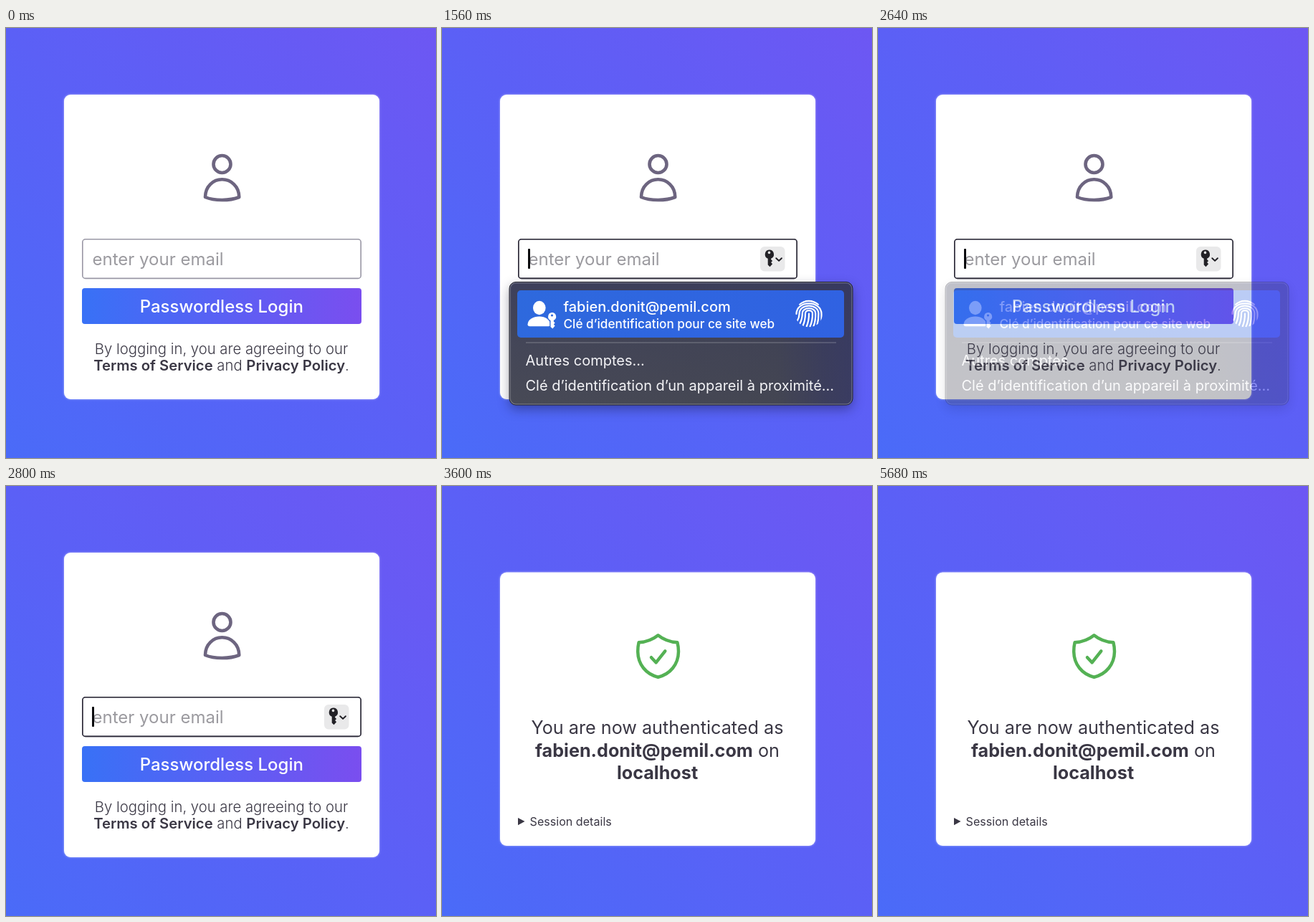
Animation, 600 px wide and 600 px high, one loop 5.8 s. Source, as an HTML page:

```html
<!DOCTYPE html>
<html lang="en">
<head>
<meta charset="utf-8">
<title>Passwordless login</title>
<style>
  html, body { margin: 0; width: 100%; height: 100%; overflow: hidden; }
  body { background: linear-gradient(45deg, #4a6bf8, #5b60f6 50%, #6d57f3); }
  svg { display: block; width: 100%; height: 100%; }
  text { font-family: Inter, "Noto Sans", sans-serif; font-optical-sizing: none; fill: #3a3744; }
  .mid { text-anchor: middle; }
  .bold { font-weight: 600; }
  .card { fill: #fff; filter: drop-shadow(0 0 1.5px rgba(255, 255, 255, .55)); }
  .line { fill: none; stroke-linecap: round; stroke-linejoin: round; }
  .field { fill: #fff; stroke: #9997a5; stroke-width: 1.6; }
  .focus .field { fill: none; stroke: #2d2b38; }
  .legal { font-size: 20.3px; font-weight: 300; }
  .result { font-size: 25.2px; }
  .result .bold { font-weight: 700; }
  .menu text { fill: #f3f3f6; font-size: 20px; }
  .menu .pick { fill: #fff; font-weight: 500; }
  .menu .sub { font-size: 17.2px; }
  .panel { filter: drop-shadow(0 6px 8px rgba(10, 10, 40, .38)); }

  .login, .done, .focus, .key, .menu { animation: 5800ms step-end infinite; }
  .login { animation-name: login; }
  .done { animation-name: done; }
  .key { animation-name: key; }
  .focus { animation-name: focus; }
  .menu { animation-name: menu; }
  @keyframes login { 0% { opacity: 1 } 59.31%, 100% { opacity: 0 } }
  @keyframes done { 0% { opacity: 0 } 59.31%, 100% { opacity: 1 } }
  @keyframes key { 0% { opacity: 0 } 24.83%, 100% { opacity: 1 } }
  @keyframes focus { 0% { opacity: 0 } 24.83% { opacity: 1 } 53.79%, 100% { opacity: 0 } }
  @keyframes menu {
    0% { opacity: 0 }
    26.9% { opacity: 1 }
    44.14% { opacity: 1; animation-timing-function: linear }
    46.2%, 100% { opacity: 0 }
  }
</style>
</head>
<body>
<svg viewBox="0 0 600 600">
  <defs>
    <linearGradient id="button">
      <stop offset="0" stop-color="#3871f6"/>
      <stop offset=".5" stop-color="#5a60f4"/>
      <stop offset="1" stop-color="#7a4eef"/>
    </linearGradient>
    <linearGradient id="glass">
      <stop offset="0" stop-color="#484a56"/>
      <stop offset=".78" stop-color="#444652"/>
      <stop offset=".92" stop-color="#3c3e5c"/>
      <stop offset="1" stop-color="#3a3c62"/>
    </linearGradient>
    <linearGradient id="tint" x2="0" y2="1">
      <stop offset="0" stop-color="#34375f" stop-opacity=".55"/>
      <stop offset=".5" stop-color="#34375f" stop-opacity=".2"/>
      <stop offset="1" stop-color="#34375f" stop-opacity="0"/>
    </linearGradient>
    <linearGradient id="active">
      <stop offset="0" stop-color="#2e69dd"/>
      <stop offset="1" stop-color="#3062e2"/>
    </linearGradient>
    <clipPath id="print"><ellipse cx="512" cy="398.5" rx="19.2" ry="19"/></clipPath>
  </defs>

  <g class="login">
    <rect class="card" x="81" y="93" width="440" height="425" rx="9"/>
    <g class="line" stroke="#6d6580" stroke-width="4.6">
      <circle cx="301.5" cy="190" r="12"/>
      <path d="M278 236C278 221 289 211.3 301.5 211.3S325.3 221 325.3 236C319 238.6 310 240 301.5 240S284 238.6 278 236Z"/>
    </g>
    <rect class="field" x="106.8" y="294.8" width="388.4" height="54.6" rx="4"/>
    <text x="120.5" y="331" font-size="24" style="fill:#9b9a9f">enter your email</text>

    <g class="key">
      <rect x="444" y="305" width="34.5" height="34.5" rx="6" fill="#e9e9ea"/>
      <g fill="#222126">
        <path fill-rule="evenodd" d="M456.5 309.5a6.4 6.4 0 0 1 2.6 12.3V323l2 2-2 2.1 2 2.1-3.6 4-2.8-2.6v-8.8a6.4 6.4 0 0 1 1.8-12.3ZM456.5 311.6a1.8 1.8 0 1 0 .01 0Z"/>
      </g>
      <path class="line" stroke="#222126" stroke-width="2" d="M466.3 321.2l3.8 3.7 3.8-3.7"/>
    </g>

    <g class="focus">
      <rect class="field" x="106.8" y="294.8" width="388.4" height="54.6" rx="4"/>
      <rect x="120" y="308" width="3" height="28" rx="1" fill="#0b0b0e"/>
    </g>

    <rect x="106" y="363" width="390" height="50" rx="4" fill="url(#button)"/>
    <text class="mid" x="300.8" y="397" font-size="24" font-weight="500" style="fill:#fff">Passwordless Login</text>
    <g class="legal mid">
      <text x="300.5" y="454.5">By logging in, you are agreeing to our</text>
      <text x="300.5" y="478.3"><tspan class="bold">Terms of Service</tspan> and <tspan class="bold">Privacy Policy</tspan>.</text>
    </g>

    <g class="menu">
      <g class="panel">
        <rect x="94" y="354.5" width="479" height="171.5" rx="9" fill="url(#glass)"/>
      </g>
      <rect x="94" y="354.5" width="479" height="171.5" rx="9" fill="url(#tint)"/>
      <rect x="94" y="354.5" width="479" height="171.5" rx="9" fill="none" stroke="#22232d"/>
      <rect x="95.2" y="355.7" width="476.6" height="169.1" rx="8" fill="none" stroke="#fff" stroke-opacity=".25" stroke-width="1.2"/>
      <rect x="105" y="366" width="456" height="66" rx="5" fill="url(#active)"/>

      <g fill="#fff">
        <ellipse cx="135.8" cy="390.5" rx="8.8" ry="9.7"/>
        <path d="M119.5 413.5C120 406.5 127 402.5 135.8 402.5S150 406.5 151.5 413.5Q151.5 416.3 148.5 416.3H122.5Q119.5 416.3 119.5 413.5Z"/>
        <path stroke="#2e69dd" stroke-width="2.6" paint-order="stroke" fill-rule="evenodd" d="M153.5 397a5.7 5.7 0 0 1 2.3 10.9V409.5l1.9 1.9-1.9 2 1.9 2-3.4 4.2-2.8-2.7v-9a5.7 5.7 0 0 1 2-10.9Z"/>
      </g>
      <circle cx="153.5" cy="401" r="1.6" fill="#2e69dd"/>

      <g class="line" stroke="#fff" stroke-width="2.2" clip-path="url(#print)">
        <path d="M499 385.5Q511.5 376 525 385.5"/>
        <path d="M494.5 399C494.5 379.5 529.5 379.5 529.5 399V408"/>
        <path d="M495.5 409Q498.6 404 498.6 398.5C498.6 384 525.4 384 525.4 398.5Q525.6 407 523.5 414"/>
        <path d="M499 413.2Q502.8 406 502.8 398.5C502.8 388.5 521.2 388.5 521.2 398.5Q521.5 408 518.5 416"/>
        <path d="M503.5 415.5Q507 408 507 398.5C507 392.7 517 392.7 517 398.5Q517.3 408 513.5 416.5"/>
        <path d="M508.7 416.5Q512.2 408 512 398.5"/>
      </g>

      <text class="pick" x="169.5" y="396">fabien.donit@pemil.com</text>
      <text class="pick sub" x="169.5" y="419.3">Clé d’identification pour ce site web</text>
      <path stroke="#fff" stroke-opacity=".2" stroke-width="1.5" d="M117 439H550"/>
      <text x="116.5" y="471">Autres comptes…</text>
      <text x="116.5" y="505.5">Clé d’identification d’un appareil à proximité…</text>
    </g>
  </g>

  <g class="done">
    <rect class="card" x="81" y="120.5" width="440" height="381.5" rx="9"/>
    <g class="line" stroke="#54b154" stroke-width="4.5">
      <path d="M301.5 208.3C293.5 214.8 284.5 217.8 274.6 218.3C273.5 223 273.2 227 273.2 231C273.5 249 284.5 262.5 301.5 266.7C318.5 262.5 329.8 249 330 231C330 227 329.6 223 328.4 218.3C318.5 217.8 309.5 214.8 301.5 208.3Z"/>
      <path d="M292 239.2L298.6 246.3L311.3 230.3"/>
    </g>
    <g class="result mid">
      <text x="300.5" y="346.3">You are now authenticated as</text>
      <text x="300.5" y="377.8"><tspan class="bold">fabien.donit@pemil.com</tspan> on</text>
      <text class="bold" x="300.5" y="409.3">localhost</text>
    </g>
    <path fill="#3a3744" d="M106 463L115.5 468L106 473.2Z"/>
    <text x="122.6" y="473.8" font-size="16.1">Session details</text>
  </g>
</svg>
</body>
</html>
```
